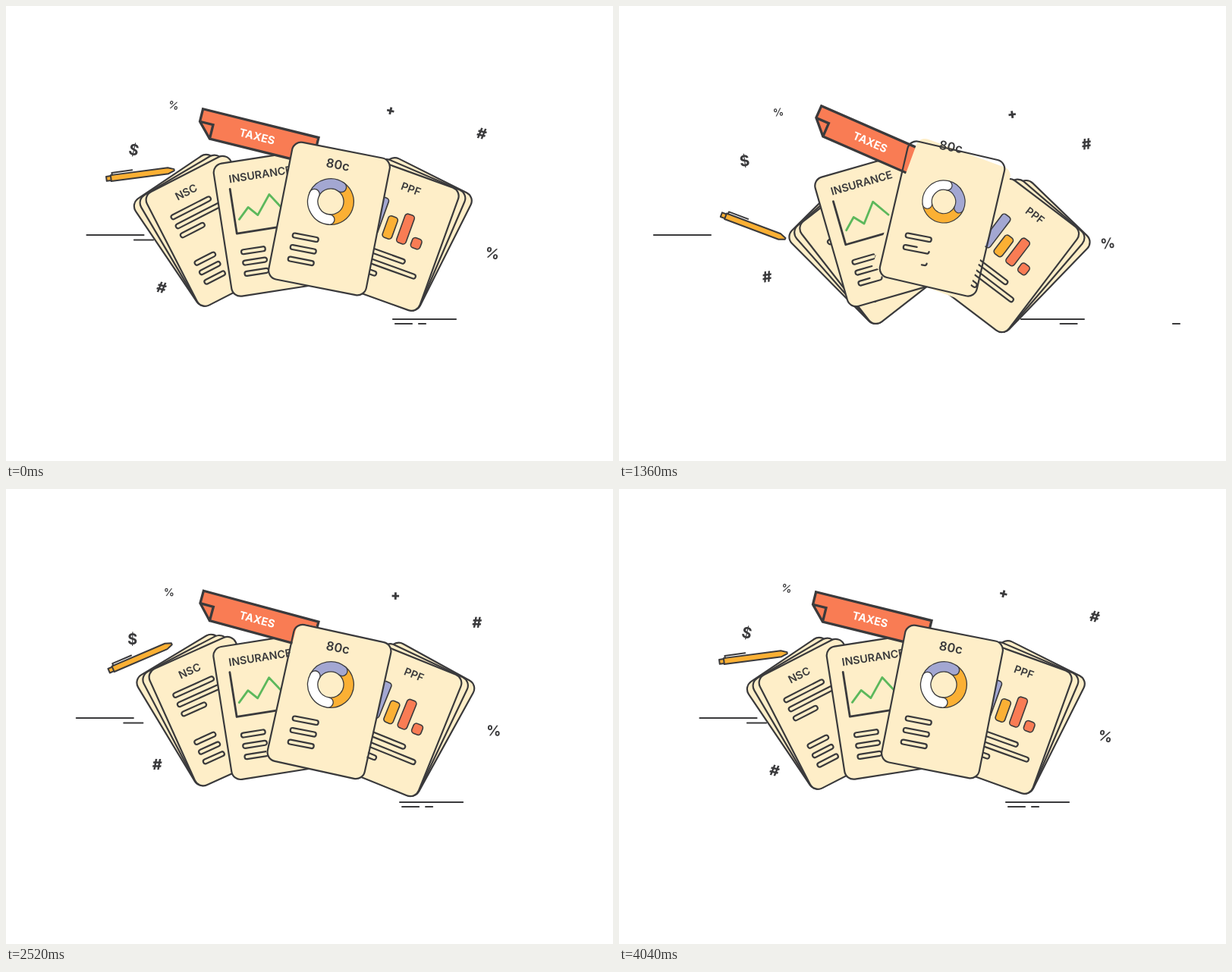
An HTML page for the animation above (4.08 s loop, 800 by 600 pixels).

```html
<!DOCTYPE html>
<html lang="en">
<head>
<meta charset="utf-8">
<title>Tax papers</title>
<style>
html, body { margin: 0; width: 100%; height: 100%; overflow: hidden; background: #fff; }
svg { display: block; width: 800px; height: 600px; }
text { font-family: Inter, "Open Sans", sans-serif; text-anchor: middle; fill: #3a3a3c; stroke: none; }
</style>
</head>
<body>
<svg id="stage" viewBox="0 0 800 600" fill="none" stroke="#3a3a3c" stroke-width="2.2" stroke-linecap="round" stroke-linejoin="round"></svg>
<script>
const LOOP = 4080, END = 4040;
const CREAM = '#feeec8', ORANGE = '#fbb034', RED = '#f97c54', LILAC = '#a3a7d2', GREEN = '#5cb85c';
const stage = document.getElementById('stage');

// Timing helpers
const progress = (t, start, span) => Math.max(0, Math.min(1, (t - start) / span));
const easeOut = (u, power) => 1 - (1 - u) ** power;
const mix = (a, b, u) => a + (b - a) * u;
const sway = (t, size, peak, period) => size * Math.cos((t - peak) / period * 2 * Math.PI);

// Eases through key points [time, value]
function keys(t, ...points) {
  let value = points[0][1];
  for (let i = 1; i < points.length; i++) {
    const [from] = points[i - 1], [to, next] = points[i];
    value = mix(value, next, (1 - Math.cos(Math.PI * progress(t, from, to - from))) / 2);
  }
  return value;
}

// Drawing helpers
const box = (x, y, w, h, r) => `M${x + w},${y + r}v${h - 2 * r}a${r},${r} 0 0 1 ${-r},${r}h${2 * r - w}` +
  `a${r},${r} 0 0 1 ${-r},${-r}v${2 * r - h}a${r},${r} 0 0 1 ${r},${-r}h${w - 2 * r}a${r},${r} 0 0 1 ${r},${r}z`;
const path = (d, attrs = '') => `<path d="${d}" ${attrs}/>`;
const label = (s, x, y, size, weight = 600, color = '') =>
  `<text x="${x}" y="${y + size * 0.36}" font-size="${size}" font-weight="${weight}" style="fill:${color}">${s}</text>`;
const pill = (x, y, w, start) =>
  path(box(x, y - 3, w, 6, 3), `class="pill" pathLength="1" data-start="${start}"`);
const pills = (x, y, gap, widths, start, delay = 0) =>
  widths.map((w, i) => pill(x, y + i * gap, w, start + i * delay)).join('');
const bar = (i, height, color) =>
  path(box(-36 + i * 19.8, 6.6 - height, 13, height, 4), `fill="${color}" stroke-width="1.6"`);
const sheet = h => path(box(-62, -86, 124, h, 12), `fill="${CREAM}"`);
const stack = (h, cornerX, step) =>
  [2, 1, 0].map(i => `<g transform="rotate(${i * step} ${cornerX} ${h - 92})">${sheet(h)}</g>`).join('');

function arc(from, to, color) {
  const at = a => [Math.cos(a * Math.PI / 180) * 23.7, Math.sin(a * Math.PI / 180) * 23.7];
  const d = `M${at(from)}A23.7,23.7 0 0 1 ${at(to)}`;
  return path(d, 'stroke-width="14.6"') + path(d, `stroke="${color}" stroke-width="12"`);
}

function add(html) {
  const g = document.createElementNS('http://www.w3.org/2000/svg', 'g');
  g.innerHTML = html;
  return stage.appendChild(g);
}

// A piece appears at its start time; pose(t) gives x, y, angle and scale
const pieces = [];
const piece = (start, html, pose) => pieces.push({ start, pose, el: add(html) });

// Ground lines rush in from one side, then drift back slowly
function groundLine(x, y, length, side, start) {
  const speed = side < 0 ? 0.009 : 0.006;
  piece(start, path(`M0,${y}h${length}`), t => [
    x + side * (speed * (END - t) + 400 * (1 - progress(t, start, 600)) ** 3), 0]);
}
groundLine(106.5, 302, 75, -1, 1031);
groundLine(169, 308.5, 25, -1, 1270);
groundLine(510, 413, 83, 1, 889);
groundLine(513, 419, 22, 1, 1066);
groundLine(544, 419, 9, 1, 1212);

// Signs pop up, then float along a straight way
function sign(s, size, weight, x, y, dx, dy) {
  piece(1000, label(s, 0, 0, size, weight), t => {
    const u = (t - 1360) / (END - 1360);
    return [x + dx * u, y + dy * u, mix(-8, 13, u), easeOut(progress(t, 1000, 240), 2)];
  });
}
sign('%', 14, 600, 210, 140, 11, -9);
sign('$', 20, 700, 165.5, 204, 3, -14.5);
sign('+', 18, 900, 518, 142, -11, -5);
sign('#', 19.5, 800, 616, 182, 11, -14);
sign('#', 19.5, 800, 195, 357, 10, 14);
sign('%', 19, 700, 644, 313, -3, 13);

// Pen
piece(1160, path('M-45,-3h6v6h-6zM-39,-4H37L45,-1V1L37,4H-39z', `fill="${ORANGE}" stroke-width="2"`) +
  path('M-37,-4V-7H-10', 'stroke-width="2"'), t => [
  177,
  keys(t, [1160, 20], [1360, 291], [1680, 222]),
  keys(t, [1160, 40], [1360, 20.6], [1800, -28], [END, -7.5])
]);

// Papers fan out around a pivot; slide is the way still to go
function paper(html, pivot, center, slide, angle) {
  piece(840, `<g transform="translate(${center})">${html}</g>`, t => {
    const left = keys(t, [840, 2], [1360, 1], [1700, 0]);
    return [pivot[0] + slide[0] * left, pivot[1] + slide[1] * left, angle(t), mix(0.7, 1, progress(t, 840, 260))];
  });
}

paper(stack(172, 58, 3.4) + label('PPF', -1, -65.5, 14.2) +
  [[50, LILAC], [30, ORANGE], [40, RED], [13.8, RED]].map(([h, color], i) => bar(i, h, color)).join('') +
  pills(-42, 28, 13.8, [66, 86, 36], 1080),
  [447, 350], [45.7, -66.2], [-14, 4],
  t => keys(t, [840, 0], [1360, 38], [1700, 20]) + sway(t, 3.2, 2330, 1360));

paper(stack(168, -58, -3.4) + label('NSC', -9, -64.5, 14.2) +
  pills(-42, -43, 13.5, [58, 68, 35], 1080) + pills(-42, 25, 14, [30, 30, 30], 1080),
  [349, 330.5], [-51.3, -62.2], [65, 8],
  t => keys(t, [840, 0], [1360, -35], [1700, -27.1]) + sway(t, 3, 2400, 2200));

paper(sheet(177) + label('INSURANCE', -1.5, -64, 14.2) +
  path('M-44,-51V8.5H9', 'stroke-width="2.8"') +
  path('M-38,-9.5L-24,-23.5L-13,-11.5L6,-36L21,-14', `stroke="${GREEN}" stroke-width="2.8"`) +
  pills(-42, 33.7, 14.5, [32, 32, 32], 1170, 20),
  [418, 351], [-60.6, -76.2], [0, 0],
  t => keys(t, [840, 5], [1360, -16], [1700, -15.5], [2880, -7.2], [END, -8.8]));

// Banner
piece(640, path('M-78,-18H79V18H-60L-78,-1zH-60V18', `fill="${RED}" stroke="none"`) +
  path('M-78,-18H79V18H-60L-78,-1zM-78,-1H-60V18', 'stroke-width="3.3" stroke-linejoin="miter"') +
  label('TAXES', 0, 0, 14.4, 700, '#fff'), t => [
  331,
  keys(t, [580, 20], [840, 180], [1300, 180], [1700, 172]),
  keys(t, [600, 8], [1360, 24], [1800, 14]) + sway(t, 1.8, 2330, 1360)
]);

// Front paper: the fill flies in on an arc and trails behind its outline
const front = box(-65.5, -92, 131, 184, 12);
const frontAngle = t => keys(t, [690, -6.5], [1360, 13.1], [2000, 15.6], [3000, 9.6], [END, 11.1]);

piece(40, path(front, `fill="${CREAM}" stroke="none"`), t => {
  const u = progress(t, 40, 680);
  return [mix(-60, 426, u ** 3), mix(490, 280.5, Math.sin(u * Math.PI / 2)),
    frontAngle(t) + keys(t, [40, -145], [720, -19.5], [1360, 7], [3000, 0])];
});
piece(690, path(front, 'id="edge" pathLength="1"'), t => [426, 280.5, frontAngle(t)]);

piece(1000, arc(306, 454, ORANGE) + arc(205, 306, LILAC) + arc(94, 205, '#fff'), t => [
  428, 258, 78 * Math.exp((1360 - t) / 400), easeOut(progress(t, 1000, 500), 2)]);
piece(1000, pills(-17.5, 0, 15.8, [34.5, 34.5, 34.5], 1080, 130), () => [395, 305.3, 11]);
piece(1260, label('80c', 0, 0, 16.5), t => [437.5, keys(t, [1260, 181], [1640, 209]), 11]);

const pillEls = [...document.querySelectorAll('.pill')];
const edge = document.getElementById('edge');

// Shows the part of an outline between two fractions of its length
function trim(el, from, to) {
  el.setAttribute('stroke-dasharray', from <= 0 && to >= 1 ? 'none' : `0 ${from} ${to - from} 2`);
  el.setAttribute('visibility', to > from ? 'visible' : 'hidden');
}

function draw(t) {
  for (const { start, pose, el } of pieces) {
    el.setAttribute('display', t > start ? 'inline' : 'none');
    const [x, y, angle = 0, scale = 1] = pose(t);
    el.setAttribute('transform', `translate(${x} ${y}) rotate(${angle}) scale(${scale})`);
  }
  for (const el of pillEls) trim(el, 0, progress(t, +el.dataset.start, 200));
  trim(edge, 0.13 * (1 - progress(t, 690, 150)), mix(0.14, 1, progress(t, 660, 410)));
}

function frame(now) {
  const t = now % LOOP;
  draw(t < 40 ? END : Math.min(t, END));
  requestAnimationFrame(frame);
}
frame(0);
</script>
</body>
</html>
```
